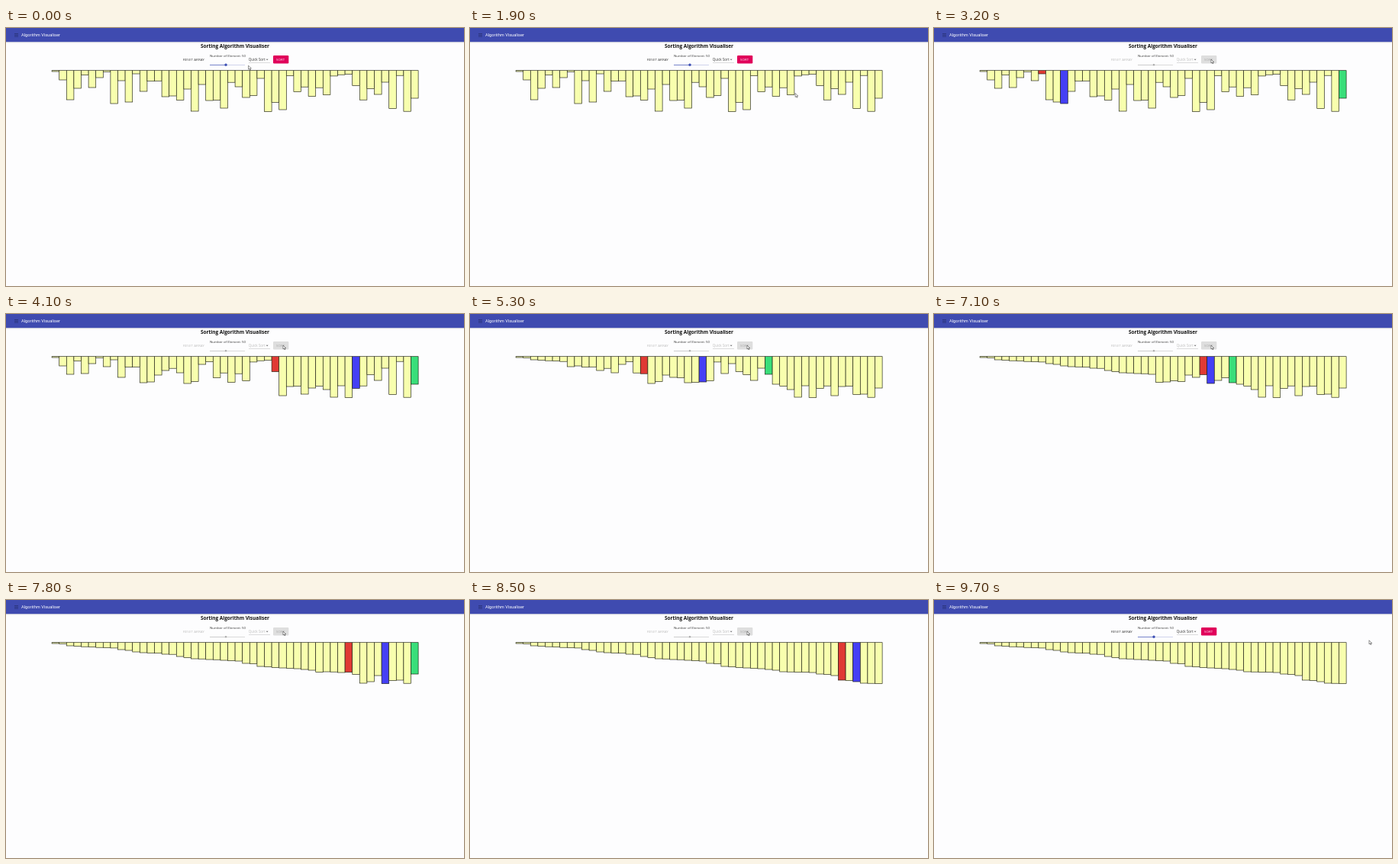
Animation, 600 px wide and 338 px high, one loop 9.9 s. Source, as an HTML page:

```html
<!DOCTYPE html>
<html lang="en">
<head>
<meta charset="utf-8">
<title>Sorting Algorithm Visualiser</title>
<style>
  html, body { margin: 0; width: 100%; height: 100%; overflow: hidden; background: #fdfdfe; }
  svg { display: block; width: 600px; height: 338px; font: 4.35px "Open Sans", "Noto Sans", sans-serif; }
  .brand { font: 400 5.68px Roboto, Arial, sans-serif; fill: #fff; }
  .title { font-weight: 700; font-size: 6.45px; text-anchor: middle; fill: #111; }
  .caps { letter-spacing: .03em; }
  #bars rect { stroke: #1c1e10; stroke-width: .65; }
  .ink { fill: #333; }
  .button { fill: #e0005a; }
  .label { fill: #fff; }
  .rail { fill: #b1b8e0; }
  .track, .thumb { fill: #3f51b5; }
  .busy .ink { fill: #bcbcbc; }
  .busy .button { fill: #dedede; }
  .busy .label { fill: #a8a8a8; }
  .busy .rail, .busy .track { fill: #c4c4c4; }
  .busy .thumb { fill: #aaa; r: 1.2px; }
  .header { filter: drop-shadow(0 .5px .8px #0004); }
</style>
</head>
<body>
<svg viewBox="0 0 600 338">
  <rect class="header" x="-4" y="-4" width="608" height="22.2" fill="#3f4bb0"/>
  <path d="M11 7.5h5M11 9.3h5M11 11.1h5" stroke="#20285f" stroke-width=".6"/>
  <text class="brand" x="20" y="11.2">Algorithm Visualiser</text>
  <text class="title" x="300" y="25.5">Sorting Algorithm Visualiser</text>

  <g id="controls">
    <text class="ink caps" x="232" y="42.6">RESET ARRAY</text>
    <text x="267" y="38.2" fill="#333">Number of Element: 50</text>
    <rect class="rail" x="267" y="48" width="46" height=".6"/>
    <rect class="track" x="267" y="48" width="21" height=".6"/>
    <circle class="thumb" cx="288" cy="48.3" r="1.7"/>
    <text class="ink" x="317.8" y="42.6" font-size="4.5">Quick Sort</text>
    <path d="M340.6 40.7h3l-1.5 1.6z" fill="#666"/>
    <rect x="318" y="45.3" width="28" height=".35" fill="#999"/>
    <rect class="button" x="350" y="36" width="20.3" height="10.5" rx="1.2"/>
    <text class="label caps" x="354" y="42.6">SORT</text>
  </g>

  <g id="bars"></g>
  <path id="cursor" d="M0 0v5l1.2-1 .8 1.8.9-.4-.8-1.7h1.6z" fill="#fff" stroke="#222" stroke-width=".5"/>
</svg>
<script>
const LOOP = 9900, STEP = 100, SORT_START = 2900, SORT_END = 8700;
const TOP = 55.7, LEFT = 60.1, PITCH = 9.6;
const COLORS = ['#e03a34', '#4540f5', '#3ade7a'], PLAIN = '#f8ffae';

// bottom edge of each bar
const initial = [
  57, 68, 94, 79, 61.6, 78, 65, 57.3, 99, 69, 97, 60, 83, 69.7, 69.3, 90, 89,
  94.5, 80, 109, 74, 95, 94.6, 105, 71.2, 77, 91, 88.5, 66, 109.6, 97.5, 107,
  62.6, 83.6, 77.2, 89.6, 78.2, 87.6, 62.9, 61.2, 60.5, 75.5, 94.2, 79.5, 87,
  71, 105.6, 62.2, 109.2, 92
];

const history = [];

function swap(a, i, j, pivot) {
  [a[i], a[j]] = [a[j], a[i]];
  history.push({ values: [...a], marks: [...new Set([i, j, pivot])], key: `${i},${j},${pivot}` });
}

function quickSort(a, low, high) {
  if (low >= high) return;
  let i = low;
  for (let j = low; j < high; j++) {
    if (a[j] < a[high]) swap(a, i++, j, high);
  }
  swap(a, i, high, high);
  quickSort(a, low, i - 1);
  quickSort(a, i + 1, high);
}
quickSort([...initial], 0, initial.length - 1);

const swapAt = (i, j, pivot) => history.findIndex(s => s.key === `${i},${j},${pivot}`);

// [time, position in the sort]
const pace = [
  [SORT_START, 0],
  [3200, swapAt(8, 11, 49)],
  [4100, swapAt(30, 41, 49)],
  [5300, swapAt(17, 25, 34)],
  [6300, swapAt(12, 12, 14)],
  [7800, swapAt(40, 45, 49)],
  [SORT_END, history.length - 1]
];

// [time, x, y]
const pointer = [
  [0, 317.6, 49.2], [900, 505, 141], [1400, 505, 141], [2300, 363, 41],
  [8800, 363, 41], [9300, 553, 62], [9700, 570, 52.8]
];

function along(points, t) {
  const next = points.findIndex(p => p[0] > t);
  if (next === 0) return points[0].slice(1);
  if (next < 0) return points[points.length - 1].slice(1);
  const [a, b] = [points[next - 1], points[next]];
  const k = (t - a[0]) / (b[0] - a[0]);
  return a.slice(1).map((v, n) => v + (b[n + 1] - v) * k);
}

const bars = initial.map((_, i) => {
  const bar = document.createElementNS('http://www.w3.org/2000/svg', 'rect');
  bar.setAttribute('x', LEFT + PITCH * i);
  bar.setAttribute('y', TOP);
  bar.setAttribute('width', PITCH);
  return document.getElementById('bars').appendChild(bar);
});
const controls = document.getElementById('controls');
const cursor = document.getElementById('cursor');

function stateAt(t) {
  if (t < SORT_START) return { values: initial, marks: [] };
  const state = history[Math.round(along(pace, t)[0])];
  return t > SORT_END ? { values: state.values, marks: [] } : state;
}

function draw(t) {
  const { values, marks } = stateAt(t);
  bars.forEach((bar, i) => {
    bar.setAttribute('height', values[i] - TOP);
    bar.setAttribute('fill', COLORS[marks.indexOf(i)] || PLAIN);
  });
  controls.classList.toggle('busy', t >= SORT_START && t <= SORT_END);
  cursor.setAttribute('transform', `translate(${along(pointer, t)})`);
}

const start = performance.now();
let shown = -1;
function tick() {
  const elapsed = Math.max(0, performance.now() - start) % LOOP;
  const t = Math.floor(elapsed / STEP) * STEP;
  if (t !== shown) draw(shown = t);
  requestAnimationFrame(tick);
}
tick();
</script>
</body>
</html>
```
